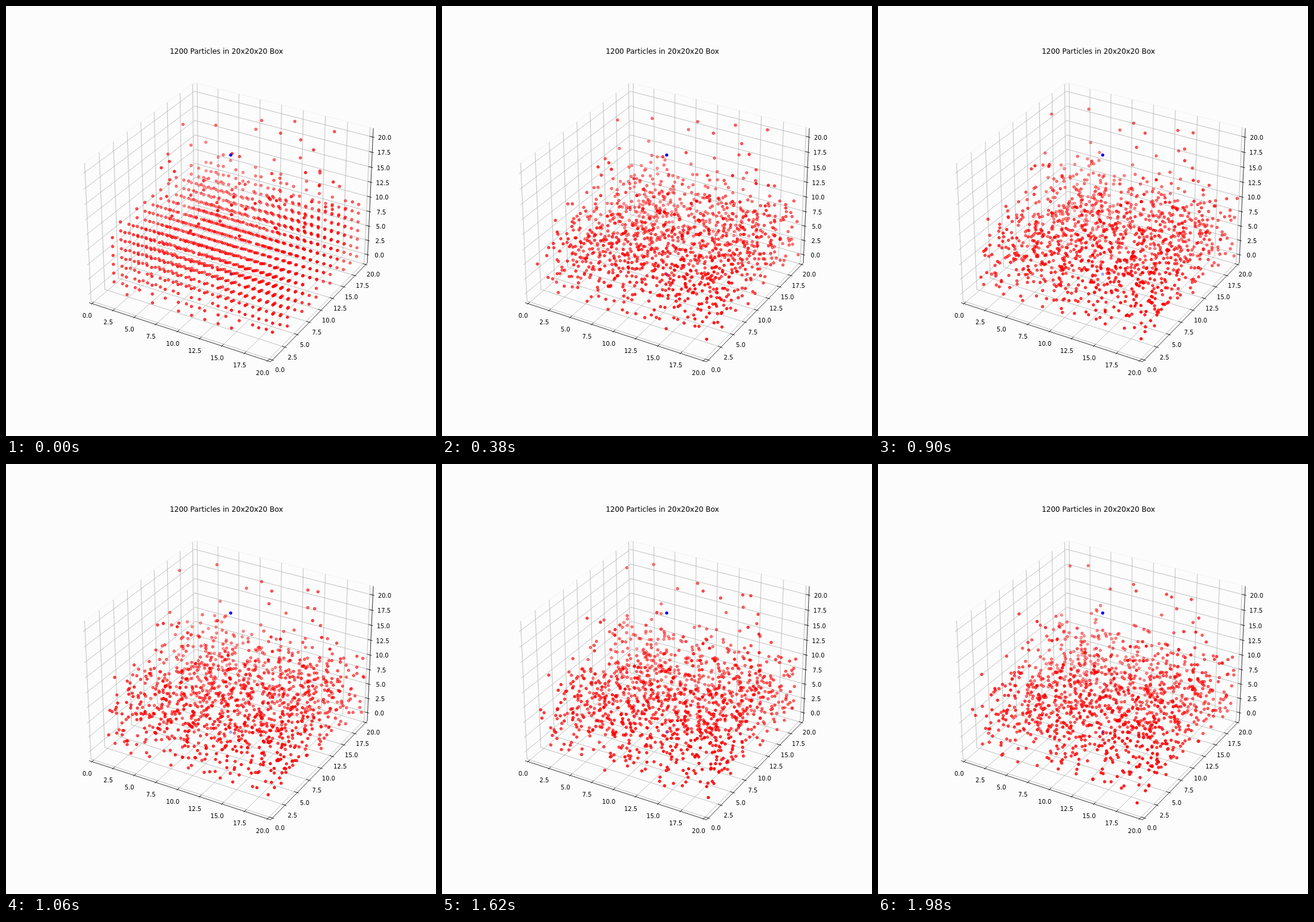
Write an HTML page with a canvas that moves like this. It is 720x720 px and loops after 2000 ms.

```html
<!DOCTYPE html>
<html>
<head>
<meta charset="utf-8">
<style>
html, body { margin: 0; width: 100%; height: 100%; overflow: hidden; background: #fcfcfc; }
canvas { display: block; }
</style>
</head>
<body>
<canvas id="stage" width="720" height="720"></canvas>
<script>
const ctx = document.getElementById('stage').getContext('2d');
const LOOP = 2000, STEP = 20, COUNT = 1200;
const CX = 376.2, CY = 351.2, SCALE = 2996.8, DIST = 10;
const UNIT = 0.05617, UNIT_Z = 0.0384;   // box units to view units
const LO = -0.35, HI = 20.35, ZLO = -1.458, ZHI = 21.458;
const S3 = Math.sqrt(3) / 2;

// Perspective camera at elevation 30, azimuth -60
function project(x, y, z) {
  const X = (x - 10) * UNIT, Y = (y - 10) * UNIT, Z = (z - 10) * UNIT_Z;
  const depth = DIST - (S3 / 2 * X - 0.75 * Y + 0.5 * Z);
  const k = SCALE / depth;
  return [CX + k * (S3 * X + 0.5 * Y), CY - k * (-0.25 * X + S3 / 2 * Y + S3 * Z), depth];
}

let seed = 20201;
function rand() {
  seed = (seed + 0x6D2B79F5) | 0;
  let t = Math.imul(seed ^ (seed >>> 15), 1 | seed);
  t = (t + Math.imul(t ^ (t >>> 7), 61 | t)) ^ t;
  return ((t ^ (t >>> 14)) >>> 0) / 4294967296;
}
const gauss = s => (rand() + rand() + rand() - 1.5) * 2 * s;
const triple = f => [f(), f(), f()];

// Lattice of 1.5: nearly full liquid layers, half-filled at its bottom and top, sparse gas above
const LIQUID = 8, LAYERS = 14;
function fill(k) {
  if (k >= LIQUID) return 0.06;
  return k % (LIQUID - 1) ? 0.95 : 0.55;
}

function makeParticle(i, j, k) {
  const gas = k >= LIQUID;
  return {
    rank: rand() / fill(k),
    pos: [i * 1.5, j * 1.5, k * 1.5 + (gas ? 0.5 : 0)],
    drift: triple(() => gauss(gas ? 0.023 : 0.011)),
    amp: triple(() => gauss(gas ? 0 : 0.33)),
    freq: triple(() => 0.06 + 0.06 * rand()),
    phase: triple(() => gauss(0.6))
  };
}

const sites = [];
for (let k = 0; k < LAYERS; k++)
  for (let i = 1; i <= 13; i++)
    for (let j = 1; j <= 13; j++)
      sites.push(makeParticle(i, j, k));
const particles = sites.sort((a, b) => a.rank - b.rank).slice(0, COUNT);

// Reflect at the walls 0 and 20
function bounce(v) {
  v = Math.abs(v) % 40;
  return v > 20 ? 40 - v : v;
}

function place({ pos, drift, amp, freq, phase }, n) {
  return project(...pos.map((v, a) => bounce(
    v + drift[a] * n + amp[a] * (Math.sin(freq[a] * n + phase[a]) - Math.sin(phase[a])))));
}

function line(color, ...points) {
  ctx.strokeStyle = color;
  ctx.beginPath();
  for (const p of points) ctx.lineTo(...project(...p).slice(0, 2));
  ctx.stroke();
}

function label(value, point, dx, dy) {
  const [x, y] = project(...point);
  ctx.fillText(value.toFixed(1), x + dx, y + dy + 3.6);
}

function drawAxes() {
  const grid = '#b0b0b0', edge = '#f0f0f0', black = '#000';
  ctx.globalAlpha = 1;
  ctx.fillStyle = '#fcfcfc';
  ctx.fillRect(0, 0, 720, 720);
  ctx.lineWidth = 0.8;
  line(edge, [LO, LO, ZHI], [LO, HI, ZHI], [HI, HI, ZHI]);
  line(edge, [LO, LO, ZLO], [LO, HI, ZLO], [HI, HI, ZLO]);
  line(edge, [LO, HI, ZLO], [LO, HI, ZHI]);
  for (let v = 0; v <= 20; v += 2.5) {
    line(grid, [v, LO, ZLO], [v, HI, ZLO], [v, HI, ZHI]);
    line(grid, [HI, v, ZLO], [LO, v, ZLO], [LO, v, ZHI]);
    line(grid, [LO, LO, v], [LO, HI, v], [HI, HI, v]);
  }
  line(black, [LO, LO, ZLO], [HI, LO, ZLO], [HI, HI, ZLO], [HI, HI, ZHI]);
  ctx.fillStyle = black;
  ctx.textAlign = 'center';
  ctx.font = '10px "DejaVu Sans", sans-serif';
  const inner = 0.333, outer = 0.167;
  for (let v = 0; v <= 20; v += 2.5) {
    line(black, [v, LO + inner, ZLO], [v, LO - outer, ZLO]);
    line(black, [HI - inner, v, ZLO], [HI + outer, v, ZLO]);
    line(black, [HI - inner, HI, v], [HI + outer, HI, v]);
    label(v, [v, LO, ZLO], -8, 20);
    label(v, [HI, v, ZLO], 12.5, 17);
    label(v, [HI, HI, v], 19.7, 0.8);
  }
  ctx.font = '12px "DejaVu Sans", sans-serif';
  ctx.fillText(COUNT + ' Particles in 20x20x20 Box', 369, 80.4);
}

// Far dots first, fading from 1 to 0.3 with depth
function scatter(color, dots) {
  dots.sort((a, b) => b[2] - a[2]);
  const far = dots[0][2], near = dots[dots.length - 1][2];
  ctx.fillStyle = ctx.strokeStyle = color;
  ctx.lineWidth = 1;
  for (const [x, y, depth] of dots) {
    ctx.globalAlpha = 1 - 0.7 * (depth - near) / (far - near);
    ctx.beginPath();
    ctx.arc(x, y, 2.236, 0, 7);
    ctx.fill();
    ctx.stroke();
  }
}

let shown = -1;
function draw() {
  const n = Math.floor(performance.now() % LOOP / STEP);
  if (n !== shown) {
    shown = n;
    drawAxes();
    scatter('#f00', particles.map(p => place(p, n)));
    scatter('#00f', [project(10, 10, 0), project(10, 10, 20)]);
  }
  requestAnimationFrame(draw);
}
draw();
</script>
</body>
</html>
```
